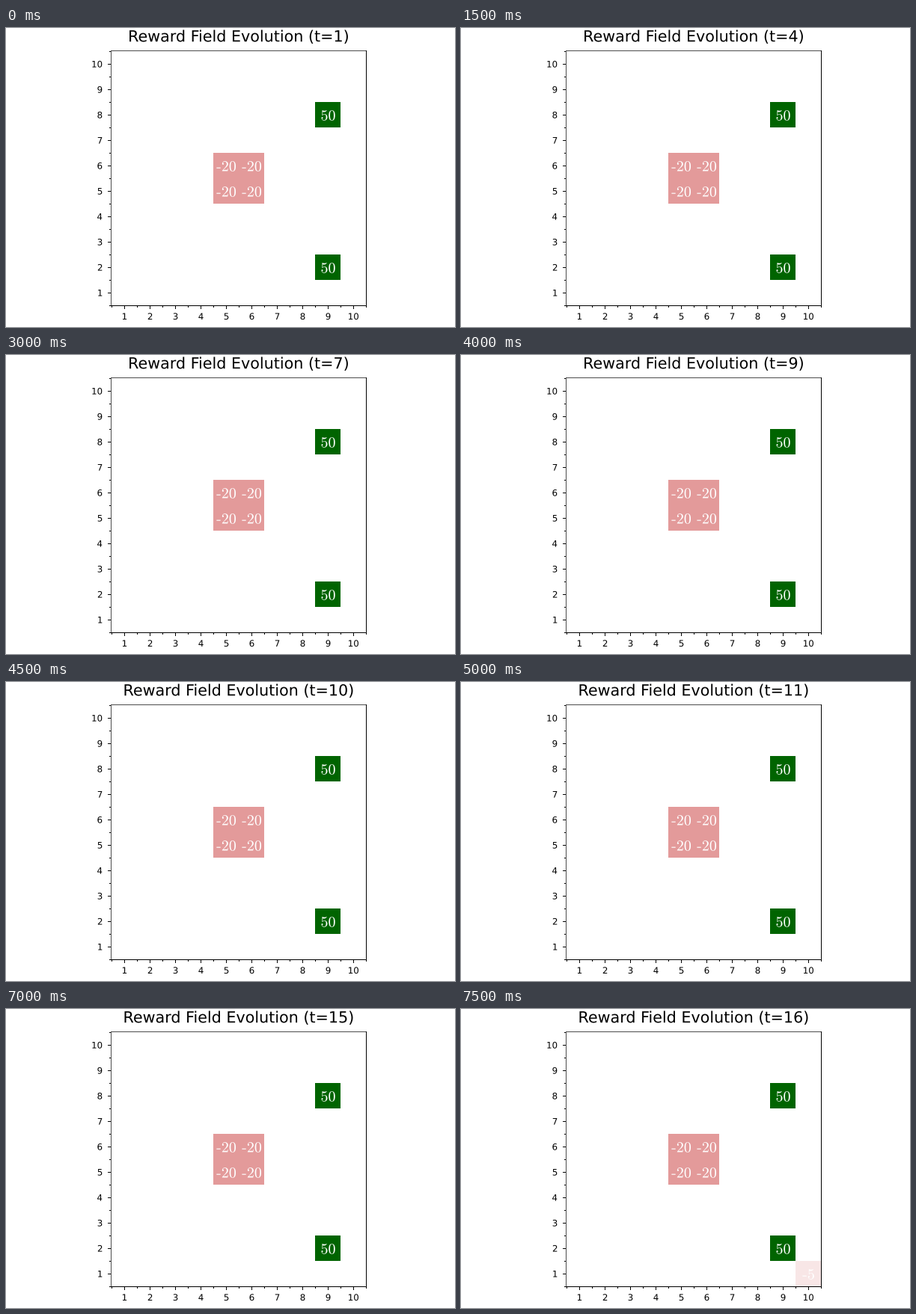
Recreate the animation shown at these times as a matplotlib script. Size 600 px wide and 400 px high, loop 8000 ms.

```python
import matplotlib.pyplot as plt
from matplotlib.animation import FuncAnimation
from matplotlib.patches import PathPatch, Rectangle
from matplotlib.textpath import TextPath
from matplotlib.transforms import Affine2D

plt.rcParams["font.family"] = "DejaVu Sans"
plt.rcParams["mathtext.fontset"] = "cm"

W, H = 600, 400
N, CELL = 10, 34
LEFT, TOP = 141, 31
RIGHT, BOTTOM = LEFT + N * CELL, TOP + N * CELL
TITLE_SIZE, TICK_SIZE, VALUE_SIZE = 20.68, 11.8, 20
GREEN, RED, PALE = "#006400", "#e39a9a", "#f8e6e6"
STEPS, LAST_SPAWN = 16, 15

fig = plt.figure(figsize=(W / 100, H / 100), dpi=100, facecolor="white")
ax = fig.add_axes([0, 0, 1, 1])
ax.set_xlim(0, W)
ax.set_ylim(H, 0)
ax.axis("off")


def box(x, y, w, h, color, z=1):
    return ax.add_patch(Rectangle((x, y), w, h, fc=color, ec="none", lw=0, zorder=z))


def place(patch, x, baseline, align):
    """Anchor a glyph outline; align 0.5 centres its ink, 1 ends it at x."""
    if align is not None:
        ink = patch.get_path().get_extents()
        x -= ink.x0 + align * ink.width
    flip = Affine2D().scale(1, -1).translate(x, baseline)
    patch.set_transform(flip + ax.transData)


def label(s, x, baseline, size, color="black", align=0.5):
    path = TextPath((0, 0), s, size=size)
    patch = ax.add_patch(PathPatch(path, fc=color, ec="none", lw=0, zorder=4))
    place(patch, x, baseline, align)
    return patch


def centre(col, row):
    return LEFT + (col - 0.5) * CELL + 0.5, BOTTOM - (row - 0.5) * CELL + 0.5


def cell(col, row, value, color):
    cx, cy = centre(col, row)
    parts = [box(LEFT + (col - 1) * CELL, BOTTOM - row * CELL, CELL, CELL, color)]
    em, digits, base = VALUE_SIZE, str(abs(value)), cy + 7
    hyphen = em / 3 if value < 0 else 0
    x = cx - (0.5 * em * len(digits) + hyphen) / 2
    if hyphen:
        parts.append(box(x + 0.011 * em, base - 0.245 * em,
                         0.265 * em, 0.058 * em, "white", 4))
        parts[-1].set_snap(False)
    parts.append(label(f"${digits}$", x + hyphen, base, em, "white", None))
    return parts


def draw_axes():
    span = N * CELL
    box(LEFT - 1, TOP - 1, 1, span + 2, "0.3", 2)
    box(LEFT - 1, TOP - 1, span + 2, 1, "0.3", 2)
    box(RIGHT, TOP - 1, 1, span + 2, "black", 3)
    box(LEFT - 1, BOTTOM, span + 2, 1, "black", 3)
    for i in range(2 * N + 1):
        length = 4 if i % 2 else 2
        step = i * CELL // 2
        box(LEFT + step, BOTTOM + 1, 1, length, "black", 3)
        box(LEFT - 1 - length, TOP + step, length, 1, "black", 3)
    for n in range(1, N + 1):
        cx, cy = centre(n, n)
        label(str(n), cx, 390, TICK_SIZE)
        label(str(n), 128.3, cy + 4.1, TICK_SIZE, align=1)


draw_axes()
for row in (2, 8):
    cell(9, row, 50, GREEN)
for col in (5, 6):
    for row in (5, 6):
        cell(col, row, -20, RED)
spawned = cell(10, 1, -5, PALE)
title = label("Reward Field Evolution (t=1)", 311, 18.2, TITLE_SIZE)


def update(i):
    text = f"Reward Field Evolution (t={i + 1})"
    title.set_path(TextPath((0, 0), text, size=TITLE_SIZE)) if hasattr(
        title, "set_path") else None
    place(title, 311, 18.2, 0.5)
    for part in spawned:
        part.set_visible(i >= LAST_SPAWN)
    return [title, *spawned]


anim = FuncAnimation(fig, update, frames=STEPS, init_func=lambda: update(0),
                     interval=500, repeat=True, repeat_delay=0, blit=False)
plt.show()
```
